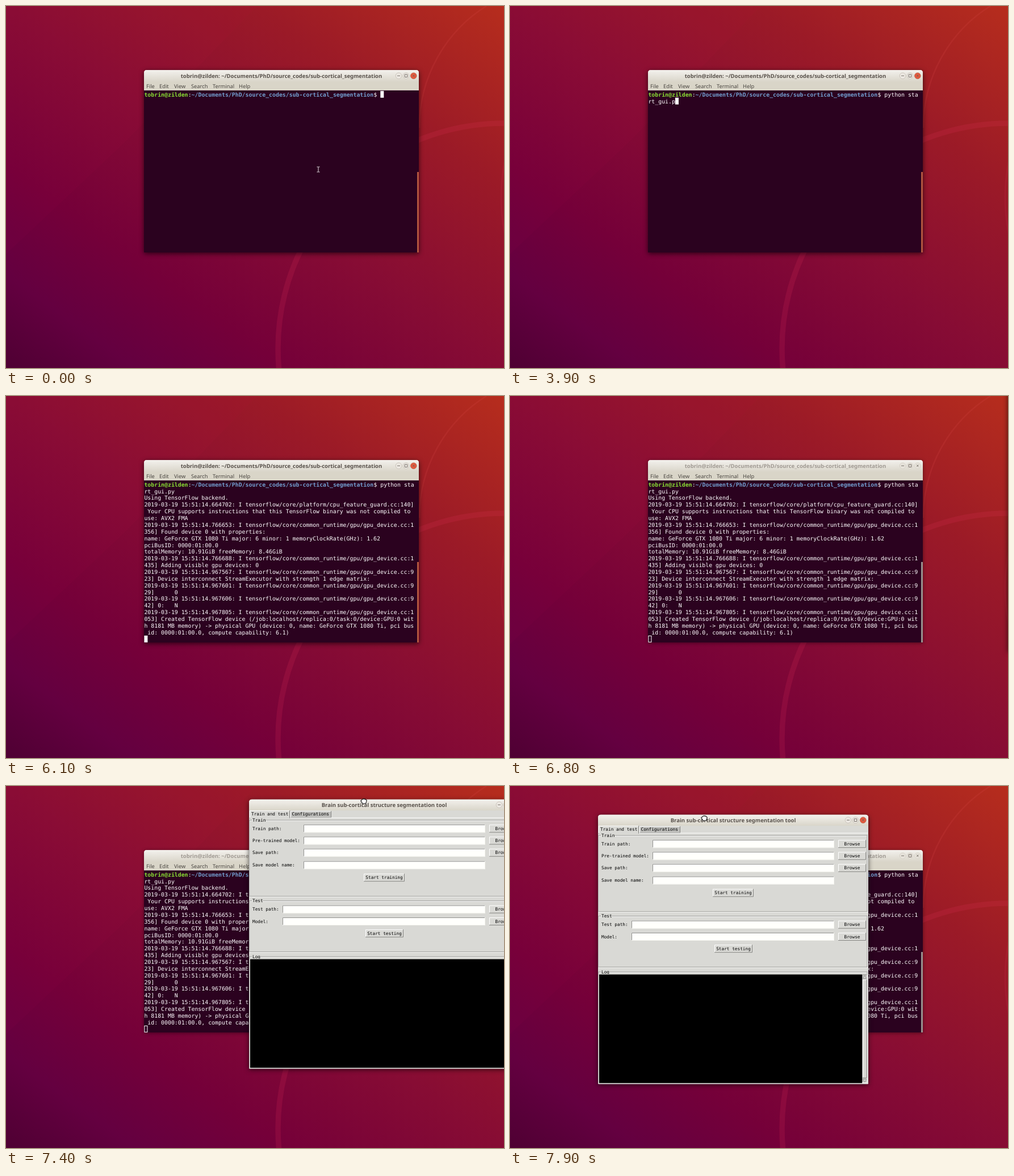
These frames come from a looping animation (877 px wide and 639 px high, 8 s). An HTML page:

```html
<!DOCTYPE html>
<html lang="en">
<head>
<meta charset="utf-8">
<title>Terminal session</title>
<style>
  html, body { margin: 0; width: 100%; height: 100%; overflow: hidden; background: #870c36; }
  svg { display: block; }
  text { white-space: pre; text-rendering: geometricPrecision; }
  .term { font: 9.87px "DejaVu Sans Mono", monospace; fill: #fff; }
  .bold { font-weight: bold; }
  .title { font: bold 9.5px "Noto Sans", "Open Sans", sans-serif; text-anchor: middle; fill: #58514b; }
  .menu { font: 9.3px "Noto Sans", "Open Sans", sans-serif; fill: #4a4641; }
  .tk { font: 7.75px "DejaVu Sans Mono", monospace; fill: #000; }
  .mid { text-anchor: middle; }
  .shadow { filter: drop-shadow(0 2px 4px rgba(0, 0, 0, .65)); }
  .blurred .shadow { filter: drop-shadow(0 1px 3px rgba(0, 0, 0, .45)); }
  .blurred .title { fill: #a09a93; }
  .thumb { fill: #b2553f; }
  .blurred .thumb { fill: #98918f; }
  .round { fill: #ece8e2; stroke: #c3bdb3; stroke-width: .8; }
  .round.close { fill: #e2593e; stroke: #bb5a45; }
  .blurred .round { fill: #e6e2da; stroke: #d3cec4; }
</style>
</head>
<body>
<svg id="stage" width="877" height="639" viewBox="0 0 877 639" xmlns="http://www.w3.org/2000/svg"></svg>
<script>
const LOOP = 8000, COL = 5.942, ROW = 11.87, LEFT = 243.4, TOP = 149.9;
const USER = 'tobrin@zilden', DIR = '~/Documents/PhD/source_codes/sub-cortical_segmentation';
const COMMAND = 'python start_gui.py', PROMPT = 70, COLUMNS = 80;

// [time, characters typed]
const TYPED = [[0, 0], [1000, 1], [1100, 3], [1200, 4], [1400, 6], [1700, 7], [1800, 8], [2000, 9],
  [2100, 11], [2500, 12], [2900, 13], [3000, 14], [3100, 15], [3400, 16], [3700, 17], [3900, 18], [4000, 19]];
const ENTER = 4500, UNFOCUS = 6200;

const stamp = s => `2019-03-19 15:51:14.${s}: I tensorflow/core/`;
const gpu = (s, digit) => stamp(s) + 'common_runtime/gpu/gpu_device.cc:' + digit;

// Output arrives in blocks; the first one starts on the third row
const OUTPUT = [
  [4800, 'Using TensorFlow backend.'],
  [5400, stamp('664702') + 'platform/cpu_feature_guard.cc:140]',
    ' Your CPU supports instructions that this TensorFlow binary was not compiled to ',
    'use: AVX2 FMA'],
  [5500, gpu('766653', 1), '356] Found device 0 with properties: ',
    'name: GeForce GTX 1080 Ti major: 6 minor: 1 memoryClockRate(GHz): 1.62',
    'pciBusID: 0000:01:00.0', 'totalMemory: 10.91GiB freeMemory: 8.46GiB'],
  [5600, gpu('766688', 1), '435] Adding visible gpu devices: 0'],
  [5800, gpu('967567', 9), '23] Device interconnect StreamExecutor with strength 1 edge matrix:',
    gpu('967601', 9), '29]      0 ', gpu('967606', 9), '42] 0:   N '],
  [5900, gpu('967805', 1),
    '053] Created TensorFlow device (/job:localhost/replica:0/task:0/device:GPU:0 wit',
    'h 8181 MB memory) -> physical GPU (device: 0, name: GeForce GTX 1080 Ti, pci bus',
    ' id: 0000:01:00.0, compute capability: 6.1)']
];
const rows = OUTPUT.flatMap(([time, ...lines]) => lines.map(line => ({ time, line })));

// [time, x, y] of the tool window
const TOOL = [[0, 1500, 0], [UNFOCUS, 877, -25], [7300, 690, -2], [7400, 428, 23.7], [7500, 246, 52],
  [7600, 192, 75], [7700, 170, 80], [7800, 159, 66], [7900, 155, 50.7]];
// [time, shape, x, y] of the mouse pointer
const POINTER = [[0, 'beam', 550, 288.5], [800, ''], [6600, 'beam', 249.5, 175.5], [6700, 'arrow', 625, 77],
  [6800, ''], [7300, 'hand', 862, 8], [7400, 'hand', 630, 27], [7600, 'hand', 395, 80],
  [7700, 'hand', 362, 86], [7800, 'hand', 348, 73], [7900, 'hand', 342, 57]];

const at = (steps, t) => steps.reduce((found, step) => step[0] <= t ? step : found);
const esc = s => s.replace(/&/g, '&amp;').replace(/</g, '&lt;').replace(/>/g, '&gt;');
const rect = (x, y, w, h, fill, more = '') =>
  `<rect x="${x}" y="${y}" width="${w}" height="${h}" fill="${fill}" ${more}/>`;
const text = (cls, x, y, s, more = '') => `<text class="${cls}" x="${x}" y="${y}" ${more}>${esc(s)}</text>`;
const path = (d, stroke, width = 1, more = 'fill="none"') =>
  `<path d="${d}" stroke="${stroke}" stroke-width="${width}" ${more}/>`;
const cell = (cls, col, row, s, more) => text(cls, LEFT + col * COL, TOP + 9.8 + row * ROW, s, more);

function wallpaper() {
  const stops = [[0, '#4f0033'], [.13, '#640040'], [.28, '#750039'], [.5, '#870c34'], [.75, '#9b1a27'], [1, '#b62d1d']];
  const ring = (x, y, r, w, alpha) =>
    `<circle cx="${x}" cy="${y}" r="${r}" fill="none" stroke="#e03058" stroke-opacity="${alpha}" stroke-width="${w}"/>`;
  return `<defs>
    <linearGradient id="sky" x1="0" y1="1" x2="1" y2="0">
      ${stops.map(([o, c]) => `<stop offset="${o}" stop-color="${c}"/>`).join('')}
    </linearGradient>
    <linearGradient id="bar" x1="0" y1="0" x2="0" y2="1">
      <stop offset="0" stop-color="#f3f1ed"/><stop offset="1" stop-color="#d9d5c9"/>
    </linearGradient></defs>` +
    rect(0, 0, 877, 639, 'url(#sky)') +
    '<path d="M0 0H442L215 235L0 438Z" fill="#ff0a50" fill-opacity=".025"/>' +
    ring(877, 605, 398, 9.5, .17) + ring(1203, 338, 331, 3, .13) +
    path('M846 0A252 252 0 0 0 728 215', '#d8484a', 2.5, 'fill="none" stroke-opacity=".18"');
}

function frame(w, h, barHeight, title) {
  const y = barHeight / 2 - .3;
  const round = (x, cls = '') => `<circle class="round ${cls}" cx="${x}" cy="${y}" r="5.3"/>`;
  const [min, max, close] = [w - 35.5, w - 22.5, w - 9.2];
  const outline = bottom => `M0 ${bottom}V5Q0 0 5 0H${w - 5}Q${w} 0 ${w} 5V${bottom}Z`;
  return `<path class="shadow" d="${outline(h)}" fill="#d9d5c9"/>` +
    `<path d="${outline(barHeight)}" fill="url(#bar)"/>` +
    text('title', w / 2, y + 3.4, title) + round(min) + round(max) + round(close, 'close') +
    path(`M${min - 2.5} ${y}h5M${max - 2.3} ${y - 2.3}h4.6v4.6h-4.6z` +
      `M${close - 1.7} ${y - 1.7}l3.4 3.4m0-3.4l-3.4 3.4`, '#69625b', .9);
}

function terminal() {
  const menus = [[247, 'File'], [270, 'Edit'], [296, 'View'], [326, 'Search'], [364, 'Terminal'], [410, 'Help']];
  return '<g id="terminal"><g transform="translate(243 113)">' +
    frame(484, 322, 21, `${USER}: ${DIR}`) + '</g>' +
    rect(243, 134, 484, 15, '#d9d5c8') +
    menus.map(([x, s]) => text('menu', x, 145.2, s)).join('') +
    rect(243, 149, 484, 286, '#2b021f') +
    '<rect class="thumb" x="724" y="293" width="3" height="142"/>' +
    cell('term bold', 0, 0, USER, 'style="fill:#8ae234"') + cell('term', 13, 0, ':') +
    cell('term bold', 14, 0, DIR, 'style="fill:#729fcf"') + cell('term', 68, 0, '$') +
    cell('term', PROMPT, 0, '', 'id="typed"') + cell('term', 0, 1, '', 'id="wrapped"') +
    rows.map((r, i) => cell('term', 0, i + 2, r.line, `id="row${i}"`)).join('') +
    rect(0, 0, 6, 12, '#fff', 'id="caret"') + '</g>';
}

// Light and dark edges of a raised (or sunken) box
function bevel(x, y, w, h, fill, light = '#fff', dark = '#858582') {
  return rect(x, y, w, h, fill) +
    path(`M${x + .5} ${y + h}V${y + .5}H${x + w}`, light) +
    path(`M${x} ${y + h - .5}H${x + w - .5}V${y}`, dark);
}

const FACE = '#d9d9d5';
const button = (x, y, w, s) =>
  bevel(x, y - 7, w, 14, FACE) + text('tk mid', x + w / 2, y + 2.6, s);
const entry = (x, y) => bevel(x, y - 7, 416 - x, 14, '#fffffc', '#929290', '#f3f3ee');
const field = (label, x, y, browse = true) =>
  text('tk', 6, y + 2.8, label) + entry(x, y) + (browse ? button(423, y, 49, 'Browse') : '');
const group = (label, y, bottom) =>
  `<rect x="1.5" y="${y + 1}" width="473" height="${bottom - y}" fill="none" stroke="#fff"/>` +
  `<rect x="1" y="${y}" width="473" height="${bottom - y}" fill="none" stroke="#989895" stroke-width=".9"/>` +
  rect(5, y - 4, label.length * 4.67 + 1, 9, FACE) + text('tk', 6, y + 2.8, label);

function tool() {
  return '<g id="tool">' + frame(476, 475, 19.6, 'Brain sub-cortical structure segmentation tool') +
    rect(0, 19.5, 476, 455.5, FACE) +
    bevel(1, 19.5, 71, 14, FACE) + bevel(73, 20.5, 72, 12, '#bfbfbc') +
    path('M72 32.5H475', '#fff') + rect(2, 31.5, 69, 3, FACE) +
    text('tk', 4, 28.8, 'Train and test') + text('tk', 75.5, 28.8, 'Configurations') +
    group('Train', 36.5, 171) +
    field('Train path:', 96, 51.5) + field('Pre-trained model:', 96, 72.7) + field('Save path:', 96, 94) +
    field('Save model name:', 96, 116, false) + button(202, 138, 72, 'Start training') +
    group('Test', 179, 269) +
    field('Test path:', 59, 194) + field('Model:', 59, 215.3) + button(205, 236.5, 67, 'Start testing') +
    group('Log', 277.5, 474) +
    rect(1, 281, 474, 194, FACE) + rect(2, 282, 463, 191.7, '#000') +
    bevel(465, 282, 9.5, 191.5, '#c3c3bf', '#8f8f8c', '#fff') +
    bevel(466, 291, 7.5, 174, FACE) +
    `<path d="M466.5 289l3.2-5 3.2 5zM466.5 467l3.2 5 3.2-5z" fill="${FACE}" stroke="#8a8a87" stroke-width=".8"/></g>`;
}

function pointers() {
  return '<g id="beam">' +
    path('M-2.5-4.5H-.7L0-4L.7-4.5H2.5M0-4V4M-2.5 4.5H-.7L0 4L.7 4.5H2.5', '#e8e3e6', 1) + '</g>' +
    '<g id="arrow">' +
    path('M0 0V13L3 10L5 14.5L7 13.6L5 9.3H9Z', '#fff', .9, 'fill="#111"') + '</g>' +
    '<g id="hand">' +
    path('M-3 4V2.2L-5-.2Q-5.6-2-3.4-2Q-3.4-4-1.4-3.7Q0-5 1.3-3.7Q3-4.3 3.6-2.8Q5.5-2.6 5-.4L4 2.2V4Z',
      '#111', 1.1, 'fill="#fff" stroke-linejoin="round"') + '</g>';
}

const stage = document.getElementById('stage');
stage.innerHTML = wallpaper() + terminal() + tool() + pointers();
const $ = id => document.getElementById(id);
const show = (id, on) => $(id).setAttribute('visibility', on ? 'visible' : 'hidden');
const move = (id, x, y) => $(id).setAttribute('transform', `translate(${x} ${y})`);

function drawCaret(t, typed) {
  const printed = rows.filter(r => r.time <= t).length;
  const end = PROMPT + typed;
  const [col, row] = t >= ENTER ? [0, printed + 2] : [end % COLUMNS, Math.floor(end / COLUMNS)];
  const hollow = t >= UNFOCUS, inset = hollow ? .5 : 0, caret = $('caret');
  const attrs = {
    x: LEFT + col * COL + inset, y: TOP + row * ROW + inset,
    width: 6 - 2 * inset, height: 12 - 2 * inset,
    fill: hollow ? 'none' : '#fff', stroke: hollow ? '#fff' : 'none'
  };
  for (const name in attrs) caret.setAttribute(name, attrs[name]);
  show('caret', !(t >= 300 && t < 800) && !(t >= 4800 && t < 5400));
}

function draw(t) {
  const typed = at(TYPED, t)[1], room = COLUMNS - PROMPT;
  $('typed').textContent = COMMAND.slice(0, Math.min(typed, room));
  $('wrapped').textContent = COMMAND.slice(room, Math.max(typed, room));
  rows.forEach((r, i) => show('row' + i, r.time <= t));
  drawCaret(t, typed);
  $('terminal').setAttribute('class', t >= UNFOCUS ? 'blurred' : '');

  const [, x, y] = at(TOOL, t);
  move('tool', x, y);
  const [, shape, px, py] = at(POINTER, t);
  for (const id of ['beam', 'arrow', 'hand']) show(id, id === shape);
  if (shape) move(shape, px, py);
}

const start = performance.now();
function tick() {
  draw((performance.now() - start) % LOOP);
  requestAnimationFrame(tick);
}
tick();
</script>
</body>
</html>
```
